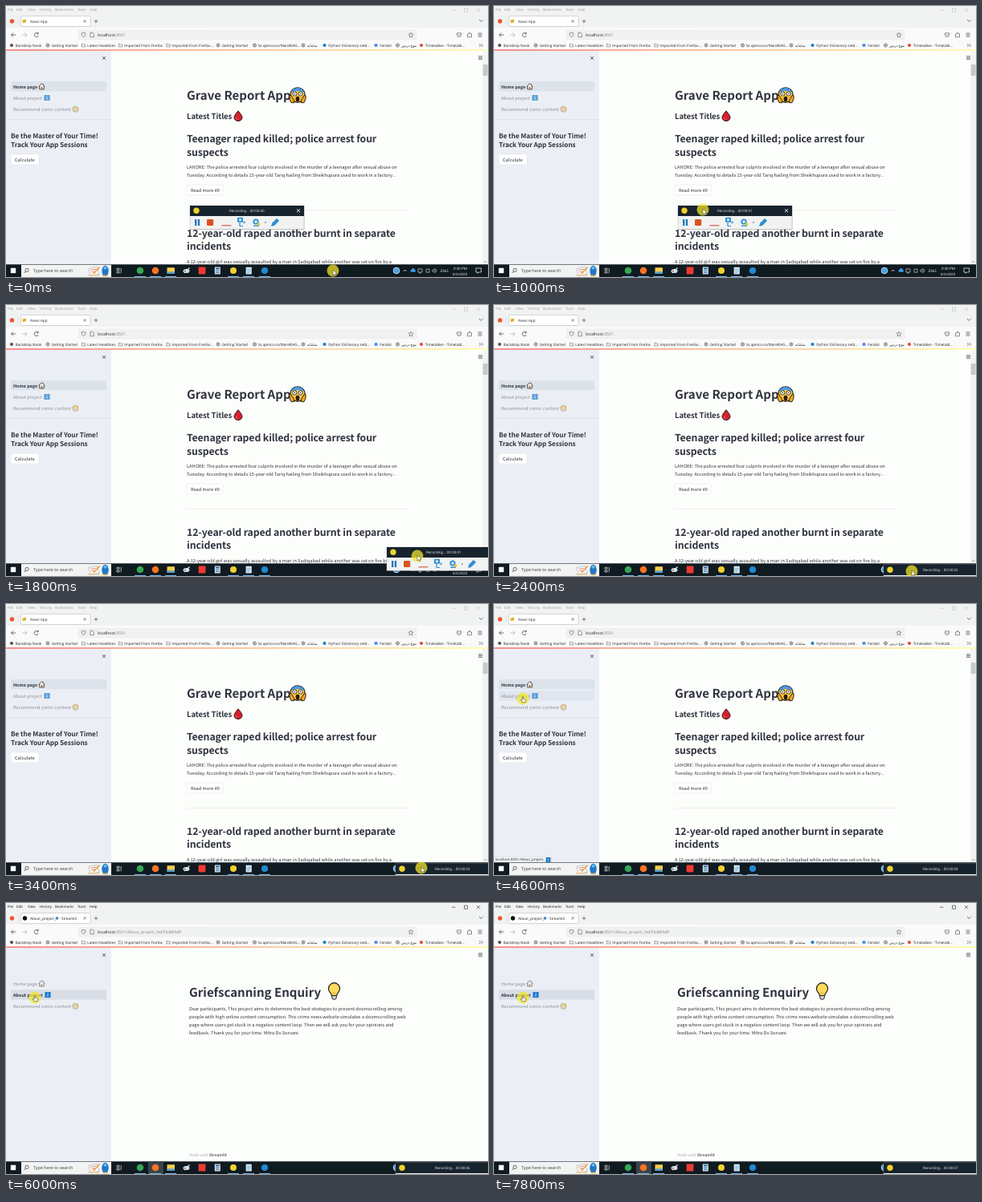
An HTML page for the animation above (8000 ms loop, 600 by 338 pixels).

```html
<!DOCTYPE html>
<html lang="en">
<head>
<meta charset="utf-8">
<title>News App</title>
<style>
html, body { margin: 0; width: 100%; height: 100%; overflow: hidden; background: #fcfefb; }
svg { display: block; width: 600px; height: 338px; }
text { text-rendering: geometricPrecision; white-space: pre; }
.ui { font-family: "Open Sans", "Noto Sans", "DejaVu Sans", sans-serif; }
.app { font-family: "Noto Sans CJK JP", "Noto Sans CJK SC", "Noto Sans CJK", "Noto Sans", sans-serif; }
.b { font-weight: 700; }
.tight { letter-spacing: -.009em; }
</style>
</head>
<body>
<svg id="stage" viewBox="0 0 600 338" xmlns="http://www.w3.org/2000/svg"></svg>
<script>
const LOOP = 8000, PAGE_AT = 5800, HOVER_AT = 4150;
const INK = '#31333f', MUTED = '#8b9098', BODY = 5.67;

const text = (x, y, s, size, fill = '#222', cls = 'ui', extra = '') =>
  `<text x="${x}" y="${y}" font-size="${size}" fill="${fill}" class="${cls}" ${extra}>${s}</text>`;
const rect = (x, y, w, h, fill, r = 0, extra = '') =>
  `<rect x="${x}" y="${y}" width="${w}" height="${h}" fill="${fill}" rx="${r}" ${extra}/>`;
const circle = (x, y, r, fill, extra = '') =>
  `<circle cx="${x}" cy="${y}" r="${r}" fill="${fill}" ${extra}/>`;
const line = (d, stroke = '#444', w = .7, fill = 'none') =>
  `<path d="${d}" stroke="${stroke}" stroke-width="${w}" fill="${fill}" stroke-linejoin="round"/>`;
const group = (id, ...parts) => `<g id="${id}">${parts.join('')}</g>`;
const at = (x, y, s, k = 1) => `<g transform="translate(${x} ${y}) scale(${k})">${s}</g>`;
const faded = s => `<g opacity=".68">${s}</g>`;
const cross = (x, y, r, c, w) => line(`M${x - r} ${y - r}l${2 * r} ${2 * r}m0 ${-2 * r}l${-2 * r} ${2 * r}`, c, w);
const app = (x, y, s, size = BODY, fill = INK, cls = '') => text(x, y, s, size, fill, 'app ' + cls);
const title = (x, y, s) => app(x, y, s, 15.04, INK, 'b');
const heading = (x, y, s, size = 12.3) => app(x, y, s, size, INK, 'b tight');
const button = (x, y, w, s) => rect(x, y, w, 13, '#fff', 1.6, 'stroke="#dcdee2" stroke-width=".5"') + app(x + 5, y + 8.7, s);

// Pictograms, drawn around their centre
const scream =
  circle(0, 0, 9.2, '#ffc83d', 'stroke="#111" stroke-width="1.2"') +
  line('M-8.5-3A9 9 0 0 1 8.5-3Q0-7-8.5-3Z', 'none', 0, '#4a9be0') +
  [-3.6, 3.6].map(x => circle(x, -1.5, 2.6, '#fff', 'stroke="#111" stroke-width=".8"') + circle(x, -1.5, .8, '#111')).join('') +
  '<ellipse cx="0" cy="5" rx="2.4" ry="3.3" fill="#2a1a12"/>' +
  line('M-10.2 1Q-8-1-7.2 2L-4.4 6.5-4.5 9.6H-8Q-10.6 6-10.2 1ZM10.2 1Q8-1 7.2 2L4.4 6.5 4.5 9.6H8Q10.6 6 10.2 1Z', '#111', .9, '#f5a623');
const drop = line('M0-6.2Q5-.5 5 2.1A5 4.4 0 0 1-5 2.1Q-5-.5 0-6.2Z', '#111', .9, '#d8202c') + line('M-3 2Q-2.6 4.3-.5 4.6', '#ff8c8c', .7);
const house = line('M-3.9.2L0-3.6 3.9.2M-2.8-.4V3.6H2.8V-.4', '#222', .75, '#f4ece4') + rect(-.8, .8, 1.6, 2.8, '#a5643c') + line('M2-3.4V-1.9', '#c33', .8);
const info = rect(-3.6, -3.6, 7.2, 7.2, '#1979ca', .5) + rect(-.45, -.7, .9, 2.9, '#fff') + circle(0, -2, .55, '#fff');
const laugh = circle(0, 0, 3.6, '#ffd261', 'stroke="#444" stroke-width=".5"') + line('M-2.2-.9L-1-1.4M.9-1.7L2-1.2', '#444', .45) +
  line('M-1.6.8L1.8.3Q1.5 2.2 0 2.3-1.3 2.2-1.6.8Z', '#555', .3, '#fff') + circle(-2.9, 1.2, .7, '#6fb4e8');
const bulb = line('M-3.2 5Q-3.4 2.5-5.4.6A7 7 0 1 1 5.4.6Q3.4 2.5 3.2 5Z', '#111', 1.1, '#ffd95b') +
  line('M-2.8 5H2.8V8.2L1.4 9.6H-1.4L-2.8 8.2Z', '#111', .9, '#c7ccd1') + line('M-1.3 5V.5M1.3 5V.5', '#d99a1c', .7);
const folder = line('M-2.2-1.7H-.5L.2-1H2.2V1.8H-2.2Z', '#555', .55);
const globe = circle(0, 0, 2.1, 'none', 'stroke="#444" stroke-width=".55"') + line('M-2 0H2M0-2Q-1.7 0 0 2Q1.7 0 0-2', '#555', .4);
const dot = c => circle(0, 0, 2.1, c);

const bookmarks = [
  [7, dot('#555'), 'Backdrop Nook'], [52, globe, 'Getting Started'],
  [96.5, folder, 'Latest Headlines'], [142.5, folder, 'Imported From Firefox'],
  [202, folder, 'Imported From Firefox...'], [264, globe, 'Getting Started'],
  [309.5, globe, 'bi.apmco.co/MainBIAG...'], [370, globe, 'سامانه'],
  [396.5, dot('#1b7fc4'), 'Python Dictionary setd...'], [460.5, dot('#4285f4'), 'Fendol'],
  [487.5, globe, 'موج درس'], [517, dot('#e04a3a'), 'Timetables - Timetabl...']
];

const menu = [[2, 'File'], [13, 'Edit'], [27, 'View'], [42, 'History'], [61, 'Bookmarks'], [89, 'Tools'], [104, 'Help']];

const browser =
  rect(0, 0, 600, 27, '#f1f2f2') + rect(0, 27, 600, 28, '#f9faf9') +
  group('menu', ...menu.map(([x, s]) => text(x, 5.6, s, 4.4))) +
  group('winButtons', line('M555 5.3H559.5', '', .6), line('M570.5 3.2H574.5V7.2H570.5Z', '', .6), cross(588, 5.2, 2.1, '', .6)) +
  circle(7.5, 19, 2.7, '#f2542d') + line('M15 15V23', '#ccc', .5) +
  rect(18.5, 12.5, 86.5, 13, '#fff', 1.6, 'stroke="#b9babd" stroke-width=".55"') +
  cross(98, 19, 1.5, '#444', .6) + line('M109.8 19H114.2M112 16.8V21.2', '#333', .6) +
  line('M589 17.2L591.3 19.4 593.6 17.2', '#333', .7) +
  line('M12 36H6.5M9 33.5L6.5 36 9 38.5', '#333', .7) +
  line('M20.5 36H26M23.5 33.5L26 36 23.5 38.5', '#aaa', .7) +
  line('M39.8 34.3A2.6 2.6 0 1 0 40.3 37M40.2 32.8V34.8H38.2', '#333', .7) +
  rect(90, 30.2, 421, 11.8, '#f0f1f1', 1.6, 'stroke="#e2e3e5" stroke-width=".4"') +
  line('M96.5 33.2L99 34Q99 37.6 96.5 39Q94 37.6 94 34Z', '#555', .6) +
  line('M105 33.2H108L109.3 34.5V38.8H105Z', '#555', .6) +
  line('M504 33L504.9 35.1 507.1 35.3 505.4 36.8 505.9 39 504 37.8 502.1 39 502.6 36.8 500.9 35.3 503.1 35.1Z', '#555', .55) +
  line('M561.5 33.8H566.5V36Q566.5 38.6 564 38.6 561.5 38.6 561.5 36ZM562.8 35.4L564 36.6 565.2 35.4', '#444', .6) +
  line('M574.5 35H576V33.8Q577 32.8 578 33.8V35H579.5V38.8H574.5Z', '#444', .6) +
  line('M587.5 34H592.5M587.5 36H592.5M587.5 38H592.5', '#333', .65) +
  bookmarks.map(([x, icon, s]) => at(x, 49, icon) + text(x + 4.8, 50.7, s, 4.55)).join('') +
  line('M588.8 47L590.8 49 588.8 51M591.6 47L593.6 49 591.6 51', '#333', .6);

const url = path => text(114, 38, `localhost<tspan fill="#888">:8501${path}</tspan>`, 5.2);
const tabs =
  group('newsTab', rect(20.5, 16.7, 4.6, 4.4, '#f2c53d', 1), line('M21.3 20.5L24.5 17.3', '#555', .6),
    text(30, 20.8, 'News App', 4.6, '#333'), url('')) +
  group('aboutTab', circle(23.5, 19, 2.7, '#111'), text(30, 20.8, 'About_project_', 4.6), at(63.5, 19, info, .45),
    text(66.5, 20.8, '· Streamlit', 4.6), url('/About_project_ℹ%EF%B8%8F'));

const sidebar =
  rect(0, 55, 131, 268, '#ebeff5') + cross(122, 65, 2, '#333', .75) +
  rect(6, 94, 119, 12.3, '#dbe2ea', 1, 'id="homeRow"') + rect(6, 108.2, 119, 12.3, '', 1, 'id="aboutRow"') +
  group('newsNav', app(9, 102.5, 'Home page', 5.45, INK, 'b'), app(9, 116.6, 'About project', BODY, MUTED),
    at(44.5, 100.3, house), at(51, 114.5, faded(info))) +
  group('aboutNav', app(9, 102.5, 'Home page', BODY, MUTED), app(9, 116.6, 'About project', 5.45, INK, 'b'),
    at(44.5, 100.3, faded(house)), at(52, 114.5, info)) +
  app(9, 130.7, 'Recommend comic content', BODY, MUTED) + at(86.5, 128.7, faded(laugh)) +
  group('session', rect(0, 141, 131, .6, '#d3d8e0'),
    heading(6, 164.7, 'Be the Master of Your Time!', 8.25),
    heading(6, 176.2, 'Track Your App Sessions', 8.25),
    button(6, 185, 35, 'Calculate'));

const newsPage = group('newsPage',
  title(225, 117, 'Grave Report App'), at(363, 111, scream),
  heading(225, 140.6, 'Latest Titles', 9.57), at(289, 137, drop),
  heading(225, 169.6, 'Teenager raped killed; police arrest four'), heading(225, 186.6, 'suspects'),
  app(225, 203.3, 'LAHORE: The police arrested four culprits involved in the murder of a teenager after sexual abuse on'),
  app(225, 213.3, 'Tuesday. According to details 15-year-old Tariq hailing from Sheikhupura used to work in a factory...'),
  button(225, 223, 45, 'Read more #0'), rect(225, 254.2, 275, .5, '#dddfe3'),
  heading(225, 287.6, '12-year-old raped another burnt in separate'), heading(225, 304.4, 'incidents'),
  app(225, 321.4, 'A 12-year-old girl was sexually assaulted by a man in Sadiqabad while another was set on fire by a'),
  rect(593, 56, 7, 266.5, '#f3f4f3'), rect(593.8, 73, 5.8, 14, '#c6c8c9'),
  line('M595.4 318.4L596.8 319.8 598.2 318.4', '#555', .7));

const aboutPage = group('aboutPage',
  title(228, 117, 'Griefscanning Enquiry'), at(408.5, 110.5, bulb),
  ...['Dear participants, This project aims to determine the best strategies to prevent doomscrolling among',
    'people with high online content consumption. This crime news website simulates a doomscrolling web',
    'page where users get stuck in a negative content loop. Then we will ask you for your opinions and',
    'feedback. Thank you for your time. Mitra Dv.Sorvani'].map((s, i) => app(228, 134.3 + 10 * i, s)),
  app(228, 316, 'Made with <tspan fill="#666" font-weight="700">Streamlit</tspan>', 4.88, '#a9abb0'));

const statusBar = group('status', rect(0, 315, 71.5, 7.6, '#f5f6f8', 0, 'stroke="#c4c7cc" stroke-width=".4"'),
  text(1.5, 320.4, 'localhost:8501/About_project_', 4.4), at(67.5, 319, info, .8));

const taskIcons =
  circle(167, 330, 4.3, '#34a853') + circle(186, 330, 4.3, '#ff7424') +
  rect(200.5, 326.3, 9.5, 7.4, '#f6cc4c', .6) + rect(200.5, 331.4, 9.5, 2.3, '#4aa0dc') +
  '<ellipse cx="224.5" cy="330.5" rx="4" ry="2.6" fill="#c9dce8"/>' + line('M222 333L228.5 326.5', '#eef4f8', 1.1) + circle(223, 331, .9, '#c9473c') +
  rect(239.6, 325.6, 8.8, 8.8, '#ee3a32', .8) +
  rect(259.8, 325.5, 7, 9, '#dbe7ef', .5) + rect(261, 326.6, 4.6, 2, '#2b6ca3') + line('M261 330.4H265.6M261 332.6H265.6', '#2b6ca3', 1) +
  circle(283, 330, 4, '#f0d22c') +
  rect(298.6, 325.8, 7.2, 8.6, '#cfe7f4', .5) + line('M300 328.5H304.5M300 330.5H304.5M300 332.5H303', '#4d90b4', .6) +
  circle(322, 330, 4.1, '#1f8ad2') +
  [167, 186, 205, 283, 302, 322].map(x => rect(x - 7, 337, 14, 1, '#76b9ed')).join('');

const searchArt =
  line('M103 327.5L113 325.5 116 334.5 105 336.3Z', '#9aa3aa', .6, '#fbfbf8') + line('M105.5 329.5L112 328.2M106.2 332L110 331.3', '#d9685a', .8) +
  line('M109 334L116.5 325.5', '#e8973a', 1.5) + rect(102, 335, 14, 1.6, '#e6c58c', .5) +
  '<ellipse cx="123.5" cy="330.5" rx="4.2" ry="6.7" fill="#2277c9"/>' + circle(123.5, 326.7, 2, '#62bdf0') + line('M120 336.3H127', '#f4b93f', 1.2);

const taskbar =
  rect(0, 322.3, 600, 15.7, '#101a21') + rect(5.8, 326.8, 6.4, 6.4, '#fff') +
  rect(19, 322.8, 112, 15.2, '#f2f3f3') + circle(26, 329.4, 2.1, 'none', 'stroke="#333" stroke-width=".7"') + line('M24.5 331L22.7 333', '#333', .8) +
  text(34, 332, 'Type here to search', 5.4, '#3c3c3c') + searchArt +
  line('M138 327.3H141V329.3H138ZM138 331H141V333H138ZM143.2 327V333.3', '#eee', .7) +
  rect(177, 322.3, 19, 15.7, '#3a444b', 0, 'id="activeTask"') + taskIcons +
  circle(486, 330, 3.8, '#2d9be0', 'stroke="#fff" stroke-width=".8"') + text(484.8, 332, '?', 5, '#fff') + line('M494.8 331L496.7 329 498.6 331', '#fff', .7) +
  rect(503.5, 328.8, 6.4, 3, '#3f9ae0', 1.5) + circle(507, 328.7, 1.8, '#3f9ae0') +
  line('M513 328H518V332H513ZM514 333H517M523 328.2H527V332.2H523Z', '#e8e8e8', .6) +
  line('M531 329H532.3L534 327.4V332.8L532.3 331.2H531ZM535.4 328.4Q536.6 330 535.4 331.8', '#e8e8e8', .6) +
  text(541, 332, 'ENG', 4.7, '#fff') + text(557, 328.5, '9:30 PM', 4.5, '#fff') + text(556, 336, '6/3/2023', 4.4, '#fff') +
  line('M585 327H591.5V332H588.5L587 333.5V332H585Z', '#fff', .7);

// Recorder panel, drawn from its top left corner
const recorder = group('recorder',
  rect(.6, .8, 142, 29.6, '#000', 0, 'opacity=".18"'),
  rect(0, 0, 142, 29.2, '#f1f2f2', 0, 'stroke="#b9bdc0" stroke-width=".5"'), rect(0, 0, 142, 13, '#17232d'),
  circle(8, 6.2, 3.7, '#f0d22c'),
  text(49, 8, '', 4.5, '#e9edf0', 'ui', 'id="clock"'), cross(135, 6.2, 2.1, '#fff', .9),
  rect(6, 17, 2.3, 8, '#1b78bd'), rect(9.8, 17, 2.3, 8, '#1b78bd'), rect(21, 17, 8.2, 8, '#d9541e', 1.4),
  line('M39.5 24.8H51.5', '#d8402c', 1),
  rect(59, 14.8, 7, 6, '#2b8fd6', 1), line('M62 21V25.5H66', '#2b8fd6', 1.2), circle(62.5, 17.8, 1.7, '#d4ebfa'), circle(67.5, 20.8, 1.5, '#6cb1df'),
  circle(82, 20, 3.6, '#2b8fd6'), circle(82, 20, 1.8, '#e9f5fc'), rect(79, 24.5, 7, 1.4, '#2b8fd6'), circle(85.5, 23, 1.9, '#e8c62d'),
  circle(94, 21, .7, '#333'),
  line('M101.5 25.5L102.5 21.8 108 16.2 110.7 18.9 105.2 24.5Z', '#1b78bd', .5, '#2b8fd6'));

const cursor = group('cursor', circle(0, 0, 7.5, '#f3e62a', 'opacity=".74"'),
  group('arrow', line('M0-1V6L1.7 4.5 2.9 7 3.9 6.5 2.8 4.1H5Z', '#222', .45, '#fff')),
  group('hand', line('M-1 4.7L-2.6 1.7Q-2.6.8-1.6 1.4L-.8 2.2V-2.5Q-.2-3.4.5-2.5V.1L3.2.8Q3.7 1 3.6 2L3 4.7Z', '#222', .5, '#fff')));

const gradient = '<defs><linearGradient id="strip"><stop stop-color="#ff4b4b"/><stop offset="1" stop-color="#fffd80"/></linearGradient></defs>';
const stage = document.getElementById('stage');
stage.innerHTML = gradient + rect(0, 0, 600, 338, '#fcfefb') + browser + tabs + newsPage + aboutPage + sidebar +
  line('M588 62.8H593M588 64.6H593M588 66.4H593', '#333', .7) + rect(0, 54.4, 600, 1.2, 'url(#strip)') +
  statusBar + taskbar + recorder + cursor;

const el = Object.fromEntries([...stage.querySelectorAll('[id]')].map(e => [e.id, e]));
const show = (on, ...ids) => ids.forEach(id => el[id].style.display = on ? '' : 'none');
const move = (e, [x, y]) => e.setAttribute('transform', `translate(${x} ${y})`);
const paint = (parent, attr, color) => [...parent.children].forEach(e => e.setAttribute(attr, color));

const cursorPath = [[100, 407, 330], [900, 260, 254], [1200, 260, 254], [1300, 267, 260], [1800, 512, 313],
  [2200, 523, 335], [2600, 517, 329], [3550, 517, 329], [4200, 36, 118]];
const panelPath = [[1300, 229, 249], [1800, 474, 302], [2200, 485, 324]];

function along(path, t) {
  const next = path.findIndex(p => p[0] > t);
  if (next === 0) return path[0].slice(1);
  if (next < 0) return path[path.length - 1].slice(1);
  const [a, b] = [path[next - 1], path[next]];
  const u = (t - a[0]) / (b[0] - a[0]), k = u * u * (3 - 2 * u);
  return [a[1] + (b[1] - a[1]) * k, a[2] + (b[2] - a[2]) * k];
}

function render(t) {
  const about = t >= PAGE_AT, hover = t >= HOVER_AT;
  show(!about, 'newsTab', 'newsPage', 'newsNav', 'session', 'homeRow');
  show(about, 'aboutTab', 'aboutPage', 'aboutNav', 'activeTask');
  show(hover, 'aboutRow', 'hand');
  show(!hover, 'arrow');
  show(hover && !about, 'status');
  el.aboutRow.setAttribute('fill', about ? '#d8dde6' : '#dfe6ef');
  paint(el.menu, 'fill', about ? '#111' : '#999');
  paint(el.winButtons, 'stroke', about ? '#222' : '#bbb');
  el.clock.textContent = `Recording... 00:00:0${Math.floor(t / 1000)}`;
  move(el.cursor, along(cursorPath, t));
  move(el.recorder, along(panelPath, t));
}

const start = performance.now();
function tick() {
  render((performance.now() - start) % LOOP);
  requestAnimationFrame(tick);
}
tick();
</script>
</body>
</html>
```
